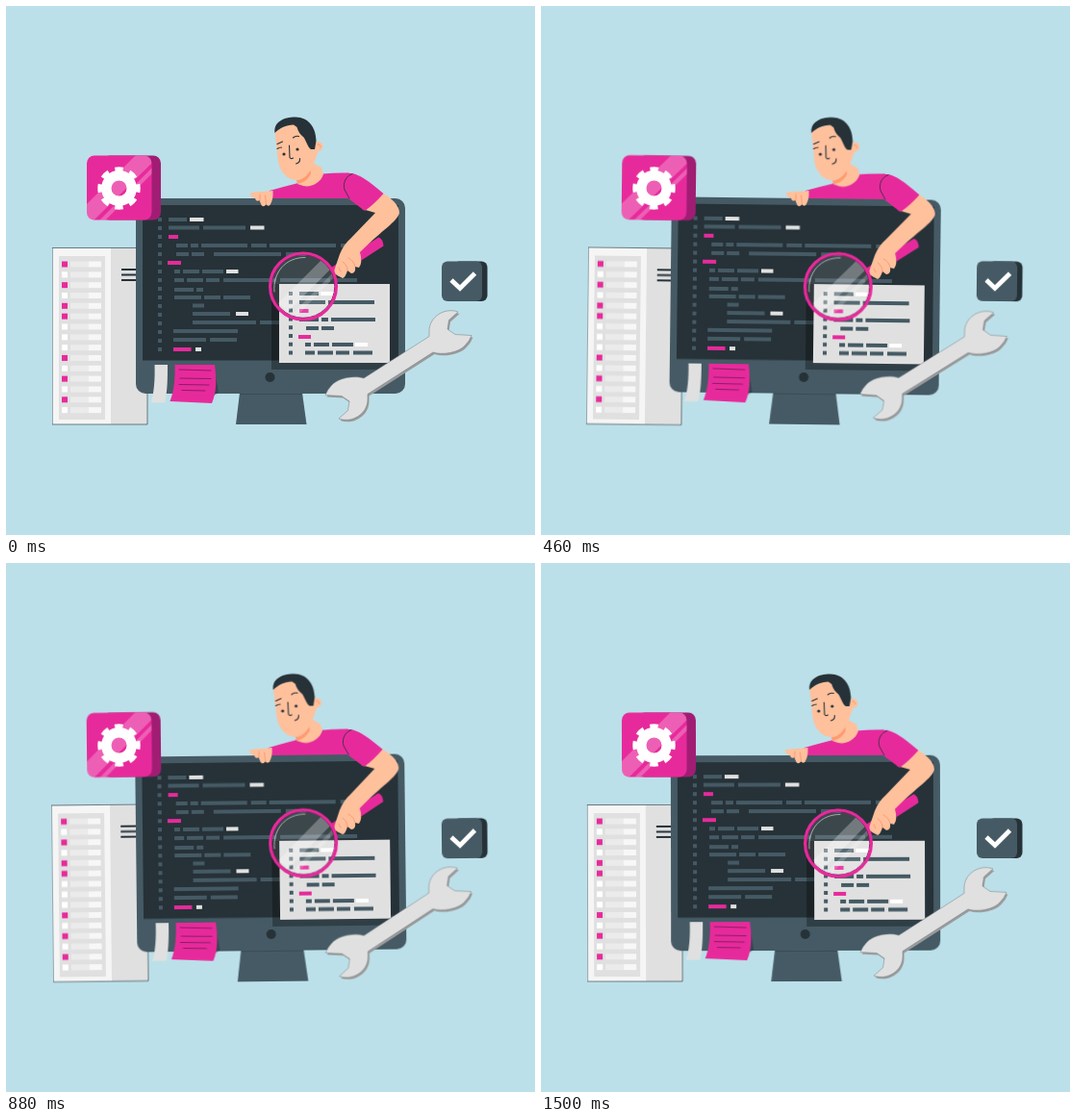
Recreate the animation shown at these times as an HTML page. Size 550 px wide and 550 px high, loop 1.54 s.

```html
<!DOCTYPE html>
<html lang="en">
<head>
<meta charset="utf-8">
<title>Code review</title>
<style>
  :root { --pink: #e72a9b; --slate: #455a64; --dark: #263238; --grey: #e0e0e0; --skin: #ffc09c; }
  html, body { margin: 0; width: 100%; height: 100%; overflow: hidden; background: #bbe0e9; }
  svg { display: block; width: 100vw; height: 100vh; }

  .sway { animation: sway 1540ms infinite; }
  .server { transform-origin: 97px 343px; }
  .desk { transform-origin: 275px 275px; }
  .tile { transform-origin: 122px 189px; }
  .badge { transform-origin: 477px 286px; }
  .wrench { transform-origin: 408px 374px; }
  @keyframes sway {
    0%, 100% { transform: rotate(0); animation-timing-function: cubic-bezier(.39, .575, .565, 1); }
    22.4% { transform: rotate(.78deg); animation-timing-function: cubic-bezier(.47, 0, .745, .715); }
    44.8% { transform: rotate(0); animation-timing-function: cubic-bezier(.39, .575, .565, 1); }
    72.4% { transform: rotate(-.95deg); animation-timing-function: cubic-bezier(.47, 0, .745, .715); }
  }

  .pink { fill: var(--pink); }
  .slate { fill: var(--slate); }
  .dark { fill: var(--dark); }
  .grey { fill: var(--grey); }
  .skin { fill: var(--skin); }
  .line { fill: none; stroke: var(--dark); stroke-width: 1; stroke-linecap: round; stroke-linejoin: round; }
  .thin { stroke-width: .8; }
  .crease { stroke: #f5936d; stroke-width: .8; }
  .code path { fill: none; stroke-width: 4; }
  .s-slate { stroke: var(--slate); }
  .s-white { stroke: var(--grey); }
  .s-pink { stroke: var(--pink); }
</style>
</head>
<body>
<svg viewBox="0 0 550 550">
  <defs>
    <clipPath id="face"><rect x="84" y="155.500" width="67.500" height="67" rx="8"/></clipPath>
    <clipPath id="glass"><circle cx="309" cy="291.500" r="33"/></clipPath>
    <path id="spanner" d="M470 318C456 313 440 323 440 338V343.500L372 387
      C363 384 345 386 338 395Q334 399 332 404.500L349 405.500L357 411L355.500 420.500L346 429
      C360 434 376 424 376 409V403.500L444 360
      C453 363 471 361 478 352Q482 348 484 342.500L467 341.500L459 336L460.500 326.500Z"/>
  </defs>

  <g class="sway server">
    <path fill="#f5f5f5" d="M48.500 251.500H109V435H48.500Z"/>
    <path class="grey" d="M109 251.500H147V435H109Z"/>
    <path class="grey" d="M55 260H103V430H55Z"/>
    <g id="slots"></g>
    <path class="line" style="stroke-width:.6" d="M48.500 251.500H147V435H48.500Z"/>
    <path d="M120 274H136M120 279.500H136M120 285H136" fill="none" stroke="#263238" stroke-width="1.800"/>
  </g>

  <g class="sway desk">
    <!-- head and torso -->
    <path class="pink" d="M269 201L274 192Q288 188 304 184L329 174.500Q343 173 356 173.500L385 201Z"/>
    <path class="skin" d="M314 160L328 168L330 175C327 184 317 189 309 187L303 185Z"/>
    <path fill="#ff9b70" d="M302 181C310 180 314 175 316 168L317 174C315 180 309 184 303 185Z"/>
    <circle class="skin" cx="324.500" cy="146" r="5"/>
    <path class="skin" d="M279.500 130L283 162C285 172 292 181 302 181C310 181 316 173 319 166L325 150L317 128L300 121Z"/>
    <path class="dark" d="M279.500 132C278 121 288 115.500 301 115.500C315 116 322 126 322.500 140L321 149H317C313 146 312 139 309 136Q304 132 302.500 126L299 123.500C291 124 284 127 279.500 132Z"/>
    <g class="line" style="stroke-width:1.100">
      <path d="M282 143.500L287.500 141M298.500 137Q301 134.500 304.500 135.500M282 148.500Q284 147 286.500 147"/>
      <path d="M294.500 145L295 157.500Q296.500 159.500 298.500 158M301.500 164Q306 163 305.500 158.500"/>
      <path class="crease" d="M324 144Q327 143 327 147"/>
    </g>
    <circle class="dark" cx="289" cy="154" r="1.600"/>
    <circle class="dark" cx="303" cy="149" r="1.600"/>

    <!-- monitor -->
    <path class="slate" d="M243 402H308L312.500 435H239Z"/>
    <path class="dark" opacity=".35" d="M243 402H308V404H243Z"/>
    <rect class="slate" x="135" y="200" width="280" height="203" rx="10"/>
    <path class="dark" d="M142 207H408V368.500H142Z"/>
    <circle class="dark" cx="274.500" cy="386" r="5"/>
    <g class="code">
      <path class="s-slate" stroke-dasharray="4 5" d="M160 220V360"/>
      <path class="s-slate" d="M169 222h19M169 230.500h32M205 230.500h44
        M177 249h12M192 249h8M203 249h48M255 249h16M274 249h69M348 249h23
        M177 258h13M193 258h13M216 258h70M291 258h21
        M175 276h6M184 276h17M204 276h22
        M175 285h10M188 285h17M208 285h14M226 285h55M285 285h52M341 285h24"/>
      <path class="s-slate" d="M175 295h20M198 295h7M175 303h28M206 303h17M226 303h28
        M194 311.500h12M194 320h39M194 329h66M264 329h20M174 338h67M174 347h34M212 347h28"/>
      <path class="s-white" d="M191 222h14.500M254 230.500h14.500M229 276h12.500M239 320h13M197 357h6"/>
      <path class="s-pink" d="M169 240h10M168 267h14M174 357h18.500"/>
    </g>
    <path opacity=".3" d="M284 289H276V378H392L399 371H284Z"/>
    <path class="grey" d="M284 289H399V371H284Z"/>
    <g class="code">
      <path class="s-slate" stroke-dasharray="4 4.800" d="M296 297V363"/>
      <path class="s-slate" d="M305 299h20M305 308h27M335 308h48M305 326h20M328 326h7M338 326h46
        M312 335h13M328 335h13M311 352h6M320 352h16M339 352h22M311 360.500h10M324 360.500h16M343 360.500h14M361 360.500h20"/>
      <path stroke="#fff" d="M327 299h14M363 352h13"/>
      <path class="s-pink" d="M305 317h9.500M304 344h13"/>
    </g>

    <!-- notes -->
    <path class="grey" d="M154.500 373H168C168 388 168 400 165 412.500H150.500C154 403 155 388 154.500 373Z"/>
    <path class="dark" opacity=".5" d="M216 373L221 402L213 407Z"/>
    <path class="pink" d="M175.500 373H217C219 388 219 402 214 413L170.500 411C175 400 176 386 175.500 373Z"/>
    <path class="line" style="stroke:#7d1c5d;stroke-width:.9" d="M180 378L213 379M181 387L213 387.500M180 393.500L211 394M183 399.500L207 400"/>

    <!-- left hand -->
    <path class="skin" d="M253.500 194.500Q259 192.500 267 193L277.500 192C278 198 277 203 274.500 207Q272 209 270.500 206Q268 210 265.500 207L263.500 202Q260 204 259 200Q255 199 253.500 194.500Z"/>
    <path class="line crease" d="M264 196V202M269.500 197L270.500 206"/>

    <!-- magnifier -->
    <g clip-path="url(#glass)" fill="#fff">
      <circle cx="309" cy="291.500" r="33" opacity=".1"/>
      <path opacity=".28" d="M329 263L339 272L293 318L283 309Z"/>
      <path opacity=".2" d="M341 276L344 279L303 322L299 319Z"/>
    </g>
    <path class="line" style="stroke:#cfd8dc;stroke-width:.7" d="M279 297C277 277 291 261 311 261.500"/>
    <circle cx="309" cy="291.500" r="32.800" fill="none" stroke="#8f1b66" stroke-width="1"/>
    <circle cx="309" cy="291.500" r="34.500" fill="none" stroke="#e72a9b" stroke-width="3"/>
    <path class="pink" d="M338 272L361 257L387.500 240.500Q392 242 392.500 249.500L367 266L342 279Z"/>

    <!-- right arm -->
    <path class="skin" d="M391 194C401 200 409 207 409 215C407 224 392 232 368 256Q371 267 367 272L363 271Q364 278 359 278L355 275Q353 282 350 283L346 281Q341 279 341.500 274L347 258Q351 248 358 242L384 215L370 211Z"/>
    <path class="line crease" d="M356 262Q362 265 363 271M350 266Q355 269 355 275M346 272L348 276"/>
    <path class="pink" d="M354 174C367 172 381 186 392.500 195Q383 206 373 213L353 198Q349 185 354 174Z"/>
    <path class="line thin" d="M360 174.500C353 177 350 184 352 191L357 200"/>
  </g>

  <g class="sway tile">
    <rect x="100" y="155.500" width="61" height="67" rx="8" fill="#a11d74"/>
    <rect class="pink" x="84" y="155.500" width="67.500" height="67" rx="8"/>
    <g clip-path="url(#face)" fill="#fff" opacity=".25">
      <path d="M137 153H152V163L91 223H84V206Z"/>
      <path d="M152 168V174L103 223H97Z"/>
    </g>
    <g fill="none" stroke="#fff">
      <circle cx="117.500" cy="189.500" r="13.200" stroke-width="10.400"/>
      <circle cx="117.500" cy="189.500" r="19" stroke-width="6.400" pathLength="16" stroke-dasharray="1.100 .9" stroke-dashoffset=".55"/>
    </g>
  </g>

  <g class="sway badge">
    <rect class="dark" x="465" y="265.500" width="35.500" height="41.500" rx="6"/>
    <rect class="slate" x="453" y="265.500" width="42" height="41.500" rx="6"/>
    <path fill="none" stroke="#fff" stroke-width="4.800" d="M463 285L472 293.500L487.500 278"/>
  </g>

  <g class="sway wrench">
    <use href="#spanner" x="1.500" y="2" fill="#9a9a9a"/>
    <use href="#spanner" fill="#e0e0e0" stroke="#6f7a80" stroke-width=".5"/>
  </g>
</svg>
<script>
  const slots = document.getElementById('slots');
  const active = [0, 2, 4, 5, 9, 11, 13];

  function bar(x, y, w, fill) {
    const r = document.createElementNS('http://www.w3.org/2000/svg', 'rect');
    const attrs = { x, y: y - 3, width: w, height: 6, fill };
    for (const k in attrs) r.setAttribute(k, attrs[k]);
    slots.append(r);
  }

  for (let i = 0; i < 15; i++) {
    const y = 268.5 + i * 10.83;
    bar(58, y, 6, active.includes(i) ? '#e72a9b' : '#fff');
    bar(67, y, 19, '#ebebeb');
    bar(86, y, 13, '#f7f7f7');
  }
</script>
</body>
</html>
```
